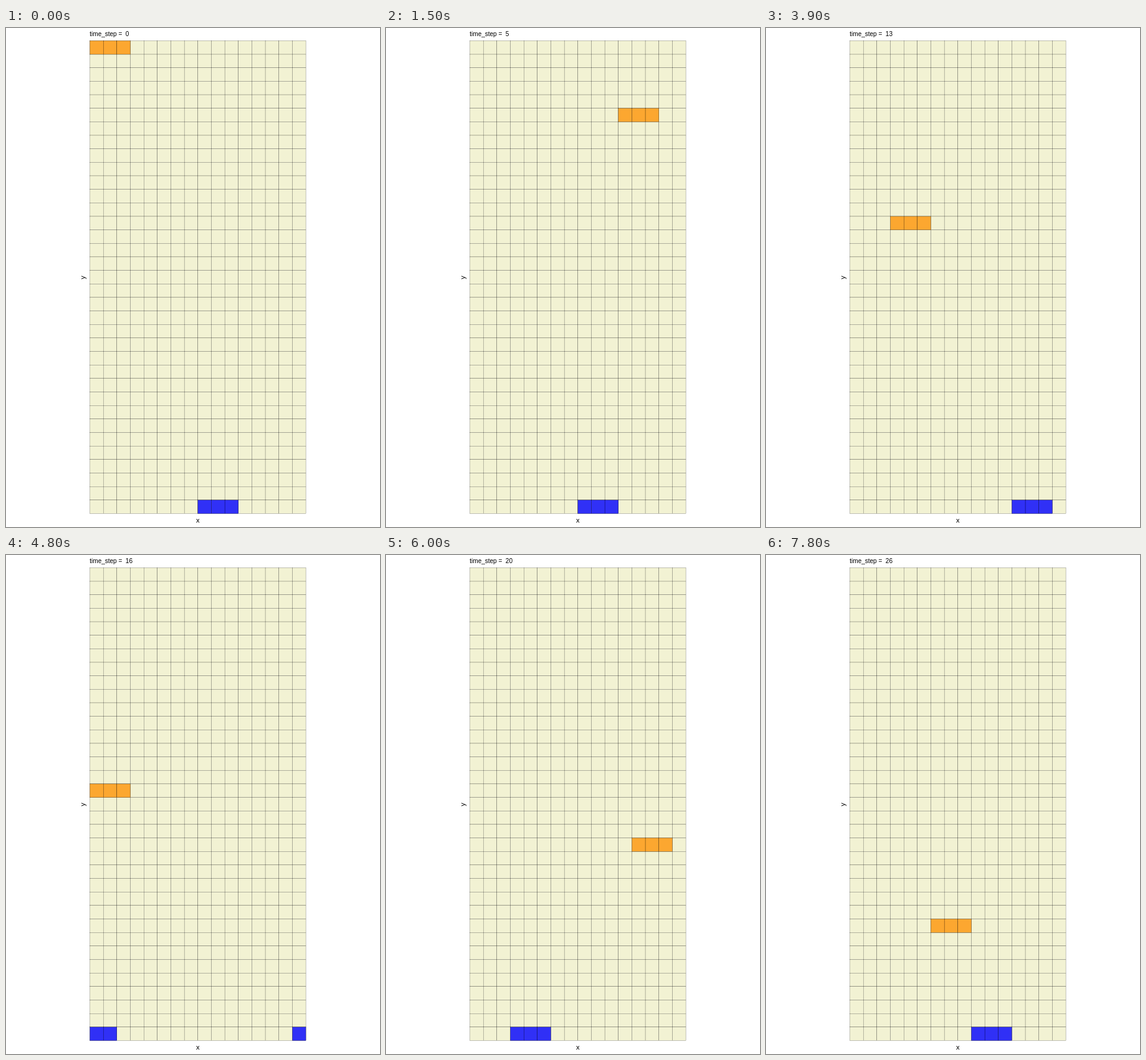
An HTML page with a canvas for the animation above (8000 ms loop, 600 px wide and 800 px high).

```html
<!DOCTYPE html>
<html lang="en">
<head>
<meta charset="utf-8">
<title>Grid steps</title>
<style>
  html, body { margin: 0; width: 100%; height: 100%; overflow: hidden; background: #fff; }
  canvas { display: block; width: 600px; height: 800px; }
</style>
</head>
<body>
<canvas id="stage" width="600" height="800"></canvas>
<script>
const ctx = document.getElementById('stage').getContext('2d');
const LOOP = 8000, STEP = 300;
const COLS = 16, ROWS = 35, CELL = 21.66, LEFT = 134.5, TOP = 20.4;
const BLOCK = 3, BLUE_START = 9;

const wrap = n => ((n % COLS) + COLS) % COLS;

function tile(col, row, fill) {
  const x = LEFT + col * CELL, y = TOP + row * CELL;
  ctx.fillStyle = fill;
  ctx.fillRect(x, y, CELL, CELL);
  ctx.strokeRect(x, y, CELL, CELL);
}

function block(col, row, fill) {
  for (let i = 0; i < BLOCK; i++) tile(wrap(col + i), row, fill);
}

function text(str, x, y, size, align, angle = 0) {
  ctx.save();
  ctx.translate(x, y);
  ctx.rotate(angle);
  ctx.font = `${size}px "Liberation Sans", Arial, sans-serif`;
  ctx.textAlign = align;
  ctx.fillStyle = '#000';
  ctx.fillText(str, 0, 0);
  ctx.restore();
}

function draw(step) {
  ctx.fillStyle = '#fff';
  ctx.fillRect(0, 0, 600, 800);
  ctx.lineWidth = 0.28;
  ctx.strokeStyle = 'rgba(0, 0, 0, 0.8)';
  for (let row = 0; row < ROWS; row++)
    for (let col = 0; col < COLS; col++) tile(col, row, '#f2f2d3');

  // Orange drifts left as it falls; blue waits, then moves right.
  block(-step, step, 'rgba(255, 149, 8, 0.8)');
  block(Math.max(step, BLUE_START) - 1, ROWS - 1, 'rgba(0, 0, 255, 0.8)');

  text(`time_step =  ${step}`, 134.3, 13, 10, 'left');
  text('x', 307.7, 793, 11, 'center');
  text('y', 126.7, 400, 11, 'center', -Math.PI / 2);
}

let shown = -1;
const start = performance.now();
function tick(now) {
  const step = Math.floor((Math.max(0, now - start) % LOOP) / STEP);
  if (step !== shown) draw(shown = step);
  requestAnimationFrame(tick);
}
tick(start);
</script>
</body>
</html>
```
